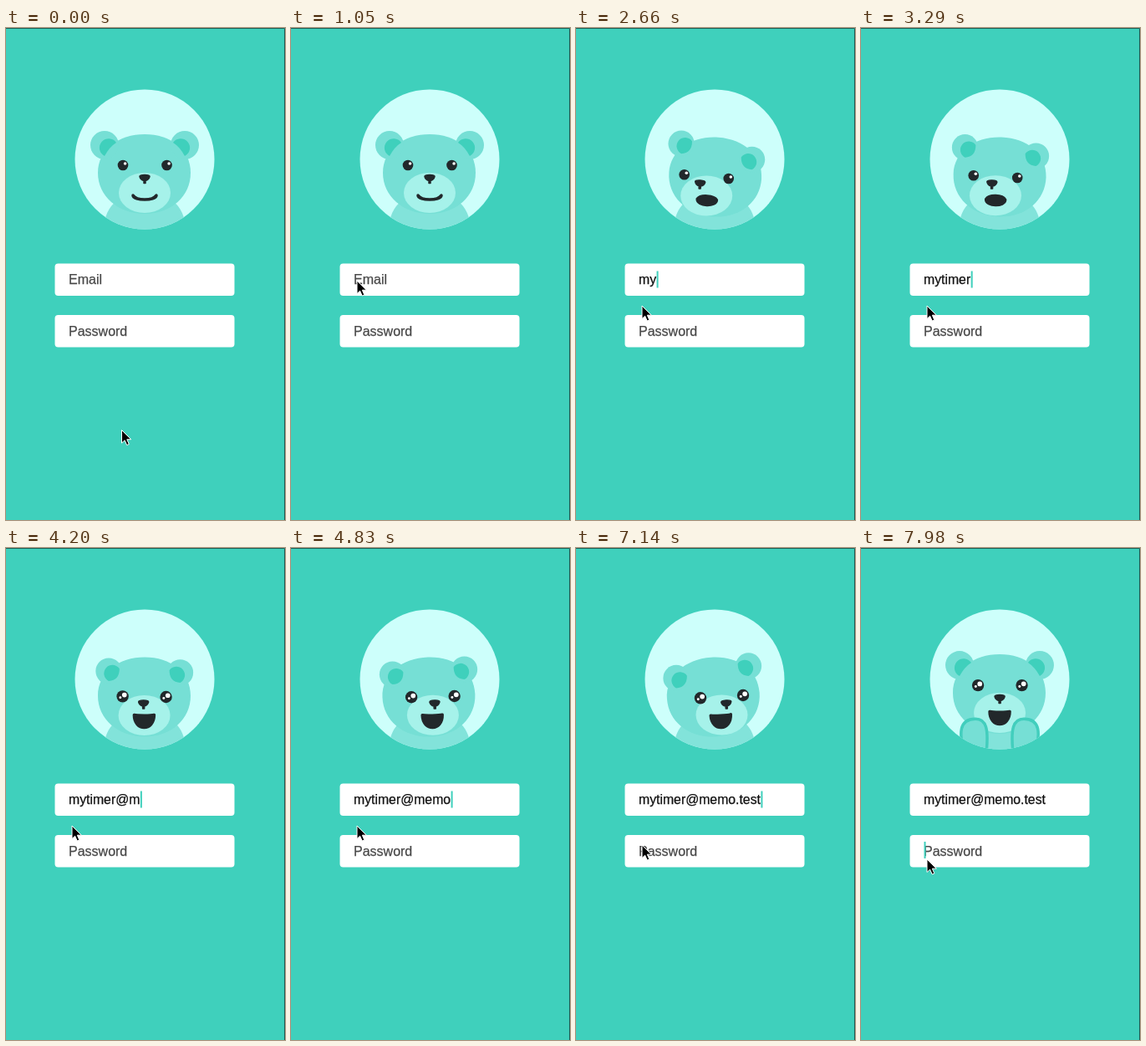
These frames come from a looping animation (334x588 px, 8 s). An HTML page:

```html
<!DOCTYPE html>
<html lang="en">
<head>
<meta charset="utf-8">
<title>Bear login</title>
<style>
html, body { margin: 0; width: 100%; height: 100%; overflow: hidden; background: #3fd0bc; }
svg { display: block; width: 334px; height: 588px; }
text { font: 16px "Liberation Sans", Arial, sans-serif; fill: #484848; stroke: #484848; stroke-width: .25; }
#typed { font-size: 15.8px; fill: #111; stroke: #111; }
.fur { fill: #76dfd5; }
.teal { fill: #3fd0bc; }
.ink { fill: #22282b; }
</style>
</head>
<body>
<svg viewBox="0 0 334 588">
  <defs>
    <clipPath id="disc"><circle cx="166" cy="157" r="83.5"/></clipPath>
    <g id="eye">
      <circle class="ink" r="6.3"/>
    </g>
    <path id="arm" class="fur" stroke="#42cebd" stroke-width="3.5" d="M124 310V245C117 222 117 204 137 204C150 204 153 216 150 245V310"/>
  </defs>
  <rect width="334" height="588" fill="#3fd0bc"/>
  <path d="M0 .5H333.5V588" fill="none" stroke="#1d5f57"/>
  <g clip-path="url(#disc)">
    <rect x="82" y="73" width="168" height="168" fill="#cdfffb"/>
    <path fill="#82e3da" d="M117 242C117 210 140 196 166 196S215 210 215 242Z"/>
    <path id="head" class="fur" d="M166 127C197 127 221 145 221 173C221 201 198 222 166 222S110 201 110 173C110 145 135 127 166 127Z"/>
    <g id="earL"><circle class="fur" r="17"/><path class="teal"/></g>
    <g id="earR"><circle class="fur" r="17"/><path class="teal"/></g>
    <ellipse id="muzzle" rx="31" ry="24" fill="#a6f2ea"/>
    <g id="eyeL"><use href="#eye"/><circle fill="#fff"/><circle fill="#fff"/></g>
    <g id="eyeR"><use href="#eye"/><circle fill="#fff"/><circle fill="#fff"/></g>
    <path id="nose" class="ink" stroke="#22282b" stroke-width="1.5" stroke-linejoin="round" d="M-6-3Q-6-5 0-5T6-3Q5 1 1 2V5H-1V2Q-5 1-6-3Z"/>
    <path id="mouth" class="ink" stroke="#22282b" stroke-width="3.5" stroke-linejoin="round"/>
    <g id="arms"><use href="#arm"/><use href="#arm" transform="translate(332) scale(-1 1)"/></g>
  </g>
  <g fill="#fff">
    <rect x="58.5" y="281.5" width="215" height="38.5" rx="4"/>
    <rect x="58.5" y="343" width="215" height="38.5" rx="4"/>
  </g>
  <text id="hint" x="75" y="306">Email</text>
  <text id="typed" x="75" y="306">mytimer@memo.test</text>
  <text x="75" y="367.5">Password</text>
  <rect id="caret" class="teal" width="2" height="20"/>
  <path id="cursor" stroke="#fff" d="M0 0V15.5L3.6 12.2 6.2 18 8.8 16.9 6.3 11.2H11.3Z"/>
</svg>
<script>
const LOOP = 8000, FOCUS = 1750, BLUR = 7420, LEFT = 75;
const $ = id => document.getElementById(id);
const email = $('typed').textContent;
const keyTimes = [2380, 2520, 2730, 2870, 3010, 3100, 3220, 3600, 3990,
                  4270, 4480, 4690, 5320, 5600, 5790, 5840, 5880];
const widths = [0, ...keyTimes.map((_, i) => $('typed').getSubStringLength(0, i + 1))];

const clamp = x => Math.min(1, Math.max(0, x));
const mix = (a, b, k) => a + (b - a) * k;
const settle = (t, start, tau = 110) => t < start ? 0 : 1 - Math.exp((start - t) / tau);
const glide = (t, a, b) => { const k = clamp((t - a) / (b - a)); return k * k * (3 - 2 * k); };
const place = (id, x, y, more = '') => $(id).setAttribute('transform', `translate(${x} ${y}) ${more}`);

// half width, corner y, upper and lower control y
const mouths = [[14, -2, 4.7, 4.7], [11.5, -1, -7, 7.7], [12, -6.5, -5.5, 13.5]];

function mouthPath(open) {
  const i = open < 1 ? 0 : 1;
  const [w, y, up, low] = mouths[i].map((a, j) => mix(a, mouths[i + 1][j], open - i));
  return `M${-w} ${y}C${-w * .7} ${up} ${w * .7} ${up} ${w} ${y}C${w} ${low} ${-w} ${low} ${-w} ${y}Z`;
}

function drawEar(id, x, y, side, down) {
  const k = mix(1, .92, down);
  place(id, x, y, `scale(${side * k} ${k})`);
  $(id).lastChild.setAttribute('d',
    `M0 13A11 11 0 1 1 14 -3Q${mix(6, 14, down)} ${mix(2, 12, down)} 0 13Z`);
}

function drawEye(id, x, y, joy) {
  place(id, x, y, `scale(${mix(1, 1.14, joy)})`);
  const [, big, small] = $(id).children;
  big.setAttribute('cx', mix(2.6, 1.9, joy));
  big.setAttribute('cy', mix(-2, -1.5, joy));
  big.setAttribute('r', mix(1.8, 2.5, joy));
  small.setAttribute('cx', -2.4);
  small.setAttribute('cy', 1.3);
  small.setAttribute('r', 1.3 * joy);
}

function drawBear(t) {
  const down = settle(t, FOCUS) - settle(t, BLUR);
  const reach = keyTimes.reduce((sum, start, i) =>
    sum + (widths[i + 1] - widths[i]) * settle(t, start, 90), 0);
  const u = (LEFT + 1 + reach - 159.5) / 62.5;
  const joy = settle(t, keyTimes[7]);
  const open = settle(t, keyTimes[0], 90) + joy;
  // rest position, looking-down position, shift per unit of sideways look
  const at = (x0, y0, x1, y1, dx, dy) =>
    [mix(x0, x1 + u * dx, down), mix(y0, y1 + u * dy, down)];

  $('head').setAttribute('transform', `translate(0 ${3.5 * down}) rotate(${-4 * u * down} 166 190)`);
  drawEar('earL', ...at(118, 140, 123, 147, -3, 8.5), 1, down);
  drawEar('earR', ...at(214, 140, 208.5, 149, -2, -8), -1, down);
  place('muzzle', ...at(166, 197, 165.5, 200, 9, -.5));
  drawEye('eyeL', ...at(140, 164, 139.5, 177.3, 9.5, 2), joy);
  drawEye('eyeR', ...at(192.5, 164, 191.5, 178, 8.5, -2), joy);
  place('nose', ...at(166, 180.5, 164.5, 187, 15.5, 0), `rotate(${-4 * u * down})`);
  place('mouth', ...at(166, 202, 165.3, 206, 8.3, 0), `rotate(${-3 * u * down})`);
  $('mouth').setAttribute('d', mouthPath(open));
  place('arms', 0, 55 * (1 - glide(t, 7680, 7990)));
}

function drawForm(t) {
  const count = keyTimes.filter(k => t >= k).length;
  $('typed').textContent = email.slice(0, count);
  $('hint').style.display = count ? 'none' : '';
  $('caret').style.display = t < FOCUS ? 'none' : '';
  if (t < BLUR) place('caret', LEFT + widths[count] + .5, 290.5);
  else place('caret', LEFT + .5, 351);
  const go = glide(t, 40, 900);
  place('cursor', mix(138.5, 79, go),
    mix(480.5, 302, go) + 30 * glide(t, 1750, 2400)
    + 23 * glide(t, 6300, 7140) + 17 * glide(t, 7300, 8000));
}

function frame() {
  const t = performance.now() % LOOP;
  drawBear(t);
  drawForm(t);
  requestAnimationFrame(frame);
}
frame();
</script>
</body>
</html>
```
